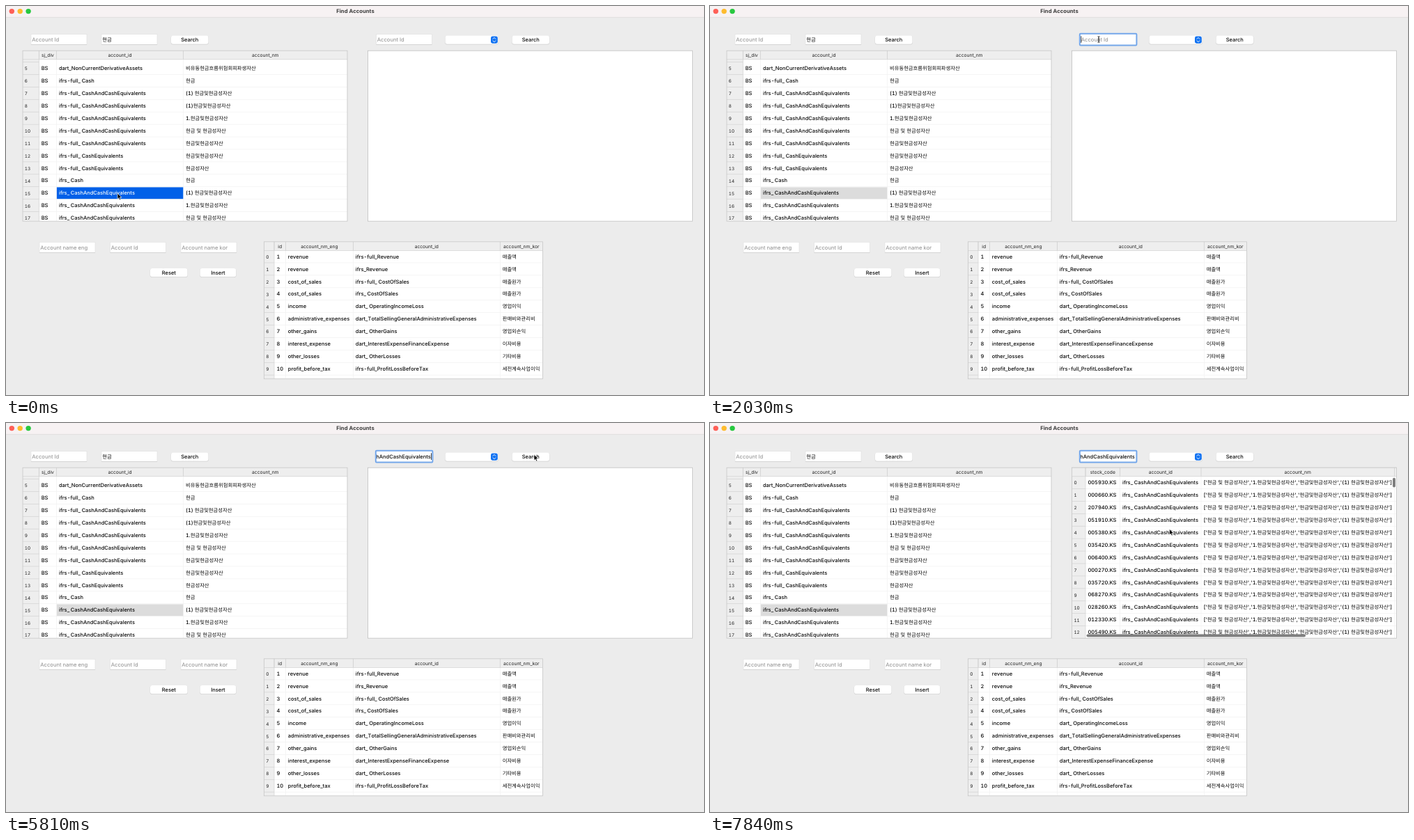
Recreate the animation shown at these times as an HTML page. Size 1002x559 px, loop 8 s.

```html
<!DOCTYPE html>
<html lang="en">
<head>
<meta charset="utf-8">
<title>Find Accounts</title>
<style>
  html, body { margin: 0; width: 100%; height: 100%; overflow: hidden; background: #ececec; }
  svg { display: block; }
  text {
    font: 500 7.47px Inter, "Noto Sans CJK KR", sans-serif; fill: #080808; white-space: pre;
    font-kerning: none; font-variant-numeric: tabular-nums; text-rendering: geometricPrecision;
  }
  .ko { font: 500 7.3px "Noto Sans CJK KR", "Noto Sans CJK", sans-serif; }
  .gap { letter-spacing: 1.6px; }
  .quote { letter-spacing: .2px; }
  .head { font-size: 6.7px; font-weight: 400; fill: #222; text-anchor: middle; }
  .index { font-size: 6.4px; font-weight: 400; fill: #222; }
  .hint { font-size: 7.65px; font-weight: 400; fill: #8c8c8c; }
  .mid { text-anchor: middle; }
  .end { text-anchor: end; }
  .title { font-size: 7.7px; font-weight: 700; fill: #3c3c3c; text-anchor: middle; }
</style>
</head>
<body>
<svg id="stage" width="1002" height="559" viewBox="0 0 1002 559"></svg>
<script>
const LOOP = 8000, STEP = 70, PITCH = 17.92;
const stage = document.getElementById('stage');

const rect = (x, y, w, h, fill, extra = '') =>
  `<rect x="${x}" y="${y}" width="${w}" height="${h}" fill="${fill}" ${extra}/>`;
const hLine = (x, y, w, color) => rect(x, y - 0.35, w, 0.7, color);
const vLine = (x, y, h, color) => rect(x - 0.35, y, 0.7, h, color);
const span = cls => run => `<tspan class="${cls}">${run}</tspan>`;

// y is the vertical centre; Hangul gets its own font, underscores stand clear of round capitals
const label = (x, y, str, cls = '', extra = '') =>
  `<text x="${x}" y="${(y + 2.7).toFixed(2)}" class="${cls}" ${extra}>` +
  str.replace(/[가-힣]+/g, span('ko')).replace(/_(?=[CO])/g, span('gap')).replace(/'/g, span('quote')) +
  '</text>';

const field = (x, y, str, cls = 'hint') =>
  rect(x, y - 7.5, 80, 15, '#fff', 'stroke="#e2e2e2" stroke-width=".7"') +
  hLine(x, y + 7.5, 80, '#cccccc') + label(x + 1.3, y + 0.3, str, cls);

const button = (x, y, w, str, id = '') =>
  rect(x - 0.3, y - 5.7, w + 0.6, 12.6, '#cfcfcf', 'rx="3.2"') +
  rect(x, y - 6, w, 12.2, '#fff', `rx="3" id="${id}"`) +
  (str ? label(x + w / 2, y, str, 'mid') : '');

function table({ x, y, w, h, edges, heads, first, start, rows, right = x + w }) {
  const top = y + 12.6, left = edges[0], ends = [...edges.slice(1), right];
  let out = rect(x, y, w, h, '#fff') + rect(x, y, w, 12.6, '#eeeeee') + rect(x, y, left - x, h, '#eeeeee');
  let body = '';
  rows.forEach((cells, i) => {
    const cy = first + i * PITCH, line = cy + PITCH / 2;
    body += hLine(x, line, left - x, '#d2d2d2') + hLine(left, line, x + w - left, '#f1f1f1') +
      label(x + 2.8, cy + 0.2, String(start + i), 'index');
    cells.forEach((cell, c) => {
      body += label(edges[c] + 3.4, cy, cell, '', `data-cell="${start + i}-${c}"`);
    });
  });
  if (first - PITCH / 2 > top + 1) body += hLine(x, first - PITCH / 2, left - x, '#d2d2d2');
  const columns = ends.map(e => vLine(e, top, h, '#f1f1f1')).join('');
  out += `<svg x="${x}" y="${top}" width="${w}" height="${h - 12.6}" viewBox="${x} ${top} ${w} ${h - 12.6}">` +
    columns + '<g class="mark"></g>' + body + '</svg>';
  heads.forEach((name, c) => {
    out += label((edges[c] + ends[c]) / 2, y + 6.2, name, 'head') + vLine(edges[c], y, 12.6, '#cbcbcb');
  });
  if (right < x + w) out += vLine(right, y, 12.6, '#cbcbcb');
  return out + hLine(x, top, w, '#d2d2d2') + vLine(left, y, h, '#d2d2d2') +
    rect(x, y, w, h, 'none', 'stroke="#c6c6c6" stroke-width=".8"');
}

const CASH = '현금및현금성자산', SPACED = '현금 및 현금성자산';
const EQUIV = 'CashAndCashEquivalents';
const found = [
  ['dart_NonCurrentDerivativeAssets', '비유동현금흐름위험회피파생자산'],
  ['ifrs-full_Cash', '현금'],
  ...['(1) ' + CASH, '(1)' + CASH, '1.' + CASH, SPACED, CASH].map(n => ['ifrs-full_' + EQUIV, n]),
  ['ifrs-full_CashEquivalents', CASH],
  ['ifrs-full_CashEquivalents', '현금성자산'],
  ['ifrs_Cash', '현금'],
  ...['(1) ' + CASH, '1.' + CASH, SPACED].map(n => ['ifrs_' + EQUIV, n])
].map(row => ['BS', ...row]);

const saved = [
  ['revenue', 'ifrs-full_Revenue', '매출액'],
  ['revenue', 'ifrs_Revenue', '매출액'],
  ['cost_of_sales', 'ifrs-full_CostOfSales', '매출원가'],
  ['cost_of_sales', 'ifrs_CostOfSales', '매출원가'],
  ['income', 'dart_OperatingIncomeLoss', '영업이익'],
  ['administrative_expenses', 'dart_TotalSellingGeneralAdministrativeExpenses', '판매비와관리비'],
  ['other_gains', 'dart_OtherGains', '영업외손익'],
  ['interest_expense', 'dart_InterestExpenseFinanceExpense', '이자비용'],
  ['other_losses', 'dart_OtherLosses', '기타비용'],
  ['profit_before_tax', 'ifrs-full_ProfitLossBeforeTax', '세전계속사업이익']
].map((row, i) => [String(i + 1), ...row]);

const names = `['${SPACED}','1.${CASH}','${CASH}','(1) ${CASH}']`;
const stocks = '005930 000660 207940 051910 005380 035420 006400 000270 035720 068270 028260 012330 005490'
  .split(' ').map(code => [code + '.KS', 'ifrs_' + EQUIV, names]);

const lights = ['#fe5f57', '#febc2e', '#28c840']
  .map((c, i) => `<circle cx="${8.3 + i * 11.9}" cy="7.6" r="3.7" fill="${c}"/>`).join('');

stage.innerHTML =
  rect(0, 0, 1002, 559, '#ececec') + rect(0, 0, 1002, 16, '#f7f2f3') + hLine(0, 16.2, 1002, '#dbd7d8') +
  lights + label(501.5, 7.3, 'Find Accounts', 'title') +
  field(36, 48, 'Account Id') + field(137, 48, '현금', '') + button(237, 48.5, 53.5, 'Search') +
  '<g id="query">' + field(531.5, 48, 'Account Id') + '</g>' +
  `<g id="focus">
    <rect x="530.8" y="39.8" width="81.6" height="16.6" rx="1.2" fill="#fff" stroke="#74a7ea" stroke-width="2"/>
    <g id="blank">${label(532.8, 48.3, 'Account Id', 'hint')}</g>
    <svg id="typed" x="531.8" y="41" width="79" height="14" viewBox="531.8 41 79 14">
      ${label(609.8, 48.3, 'hAndCashEquivalents', 'end')}</svg>
    <rect id="caret" y="43.3" width=".8" height="9.6" fill="#111"/>
  </g>` +
  button(630.5, 48.5, 76, '') + rect(696, 43.5, 9.8, 10.2, '#1273f2', 'rx="2.4"') +
  '<path d="M699 47.3l1.9-1.9 1.9 1.9M699 49.9l1.9 1.9 1.9-1.9" fill="none" stroke="#fff" stroke-width=".95" stroke-linecap="round" stroke-linejoin="round"/>' +
  button(726.5, 48.5, 53.5, 'Search', 'search') +
  '<g id="accounts">' + table({
    x: 24, y: 64.2, w: 466, h: 245, edges: [47.3, 72.6, 254.6], first: 89.5, start: 5,
    heads: ['sj_div', 'account_id', 'account_nm'], rows: found
  }) + '</g>' +
  rect(519.6, 64.2, 466, 245, '#fff', 'stroke="#c0c0c0" stroke-width=".8"') +
  '<g id="results">' + table({
    x: 519.6, y: 64.2, w: 466, h: 245, right: 982.4, edges: [539, 588.6, 705], first: 85.5, start: 0,
    heads: ['stock_code', 'account_id', 'account_nm'], rows: stocks
  }) + rect(980, 78.8, 4, 13.8, '#7f7f7f', 'rx="2"') +
  rect(540.5, 303.6, 314.5, 4, '#7f7f7f', 'rx="2" id="scroll"') + '</g>' +
  field(48, 346.8, 'Account name eng') + field(149.5, 346.8, 'Account Id') + field(251, 346.8, 'Account name kor') +
  button(207, 383, 53.5, 'Reset') + button(278.5, 383, 51.8, 'Insert') +
  table({
    x: 370.4, y: 338.8, w: 400, h: 197, edges: [385, 401.4, 498.4, 709.3], first: 360, start: 0,
    heads: ['id', 'account_nm_eng', 'account_id', 'account_nm_kor'], rows: saved
  }) +
  `<g id="pointer">
    <path id="arrow" d="M0 0V8.4L1.9 6.7 3.2 9.7 4.7 9 3.4 6.1H6Z" fill="#000" stroke="#fff" stroke-width=".7" stroke-linejoin="round"/>
    <path id="beam" d="M-1.5-4.5Q0-4.5 0-3.5V3.5Q0 4.5-1.5 4.5M1.5-4.5Q0-4.5 0-3.5V3.5Q0 4.5 1.5 4.5" fill="none" stroke="#222" stroke-width=".8"/>
  </g>`;

const $ = id => document.getElementById(id);
const show = (id, on) => $(id).setAttribute('visibility', on ? 'inherit' : 'hidden');

const mark = document.querySelector('#accounts .mark');
mark.innerHTML = rect(72.9, 260.4, 181.4, 17.2, '#0060e8');
const markBox = mark.firstChild;
const markText = document.querySelector('#accounts [data-cell="15-1"]');

// time, x, y of the pointer tip
const path = [
  [0, 160, 269], [490, 160, 269], [560, 190, 267], [630, 262, 258], [700, 311, 251],
  [1120, 311, 251], [1190, 350, 235], [1260, 440, 182], [1330, 499, 138], [1400, 499, 138],
  [1470, 501, 128.5], [1610, 528, 88], [1750, 553, 54], [1890, 558, 48], [2450, 558, 48],
  [2520, 592, 45], [2590, 662, 46], [2660, 738, 51], [2730, 761, 51.2], [2870, 765, 55],
  [3080, 761, 49], [3220, 761, 49], [3430, 758, 45.3], [7420, 758, 45.3],
  [7560, 722, 78], [7700, 680, 128], [7840, 659.5, 152.3]
];

function pointerAt(t) {
  const i = path.findIndex(p => p[0] > t);
  if (i < 0) return path[path.length - 1].slice(1);
  const [a, b] = [path[i - 1], path[i]], k = (t - a[0]) / (b[0] - a[0]);
  return [a[1] + (b[1] - a[1]) * k, a[2] + (b[2] - a[2]) * k];
}

function draw(time) {
  const t = Math.floor(time % LOOP / STEP) * STEP;
  const focused = t >= 1960, pasted = t >= 2310;
  markBox.setAttribute('fill', focused ? '#dcdcdc' : '#0060e8');
  markText.style.fill = focused ? '' : '#fff';
  show('query', !focused);
  show('focus', focused);
  show('blank', focused && !pasted);
  show('typed', pasted);
  show('caret', focused && t < 7490);
  $('caret').setAttribute('x', pasted ? 610 : 532.4);
  $('search').setAttribute('fill', t >= 3430 && t < 3640 ? '#f0f0f0' : '#fff');
  show('results', t >= 7420);
  show('scroll', t >= 7490);

  const [x, y] = pointerAt(t);
  const overField = x > 531 && x < 612 && y > 40 && y < 56;
  $('pointer').setAttribute('transform', `translate(${x} ${y})`);
  show('arrow', !overField);
  show('beam', overField);
}

const began = performance.now();
function tick() {
  draw(performance.now() - began);
  requestAnimationFrame(tick);
}
tick();
</script>
</body>
</html>
```
